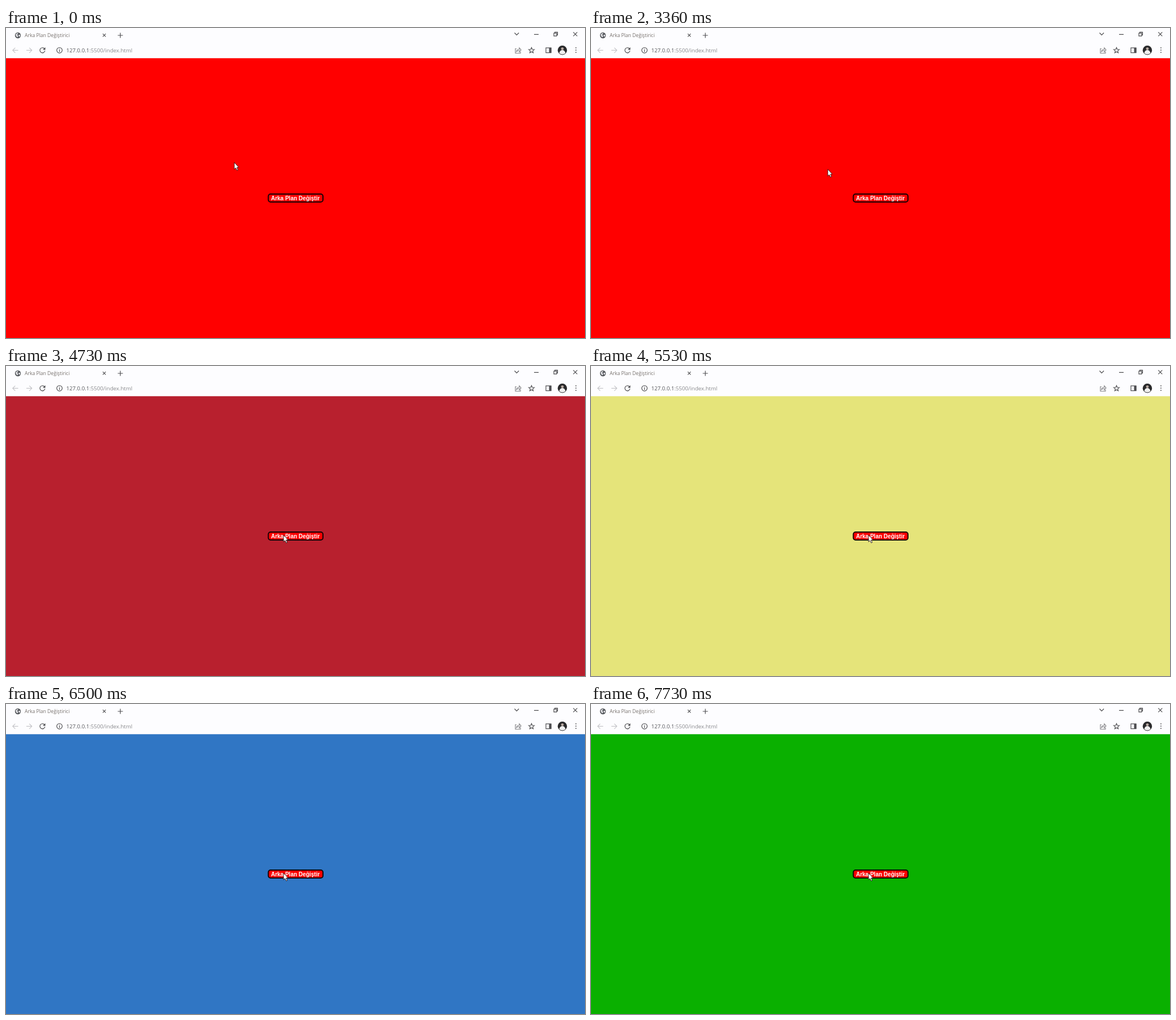
Animation, 1023 px wide and 547 px high, one loop 8 s. Source, as an HTML page:

```html
<!DOCTYPE html>
<html lang="tr">
<head>
<meta charset="utf-8">
<title>Arka Plan Değiştirici</title>
<style>
  html, body { margin: 0; width: 100%; height: 100%; overflow: hidden; }
  svg { display: block; width: 1023px; height: 547px; }
  text { font-family: "Open Sans", sans-serif; white-space: pre; }
  .icon { fill: none; stroke: #4d4d50; stroke-width: 1.2; }
  .pale { stroke: #c6c6ca; }
  .label { font: bold 10px "Liberation Sans", Arial, sans-serif; fill: #fff; }
</style>
</head>
<body>
<svg viewBox="0 0 1023 547">
  <rect width="1023" height="54" fill="#fdfdff"/>
  <rect id="page" y="53.3" width="1023" height="494" fill="#f00"/>

  <!-- tab strip -->
  <circle cx="21" cy="13" r="5.2" fill="#55585c"/>
  <path d="M17 11.5q2-3 4.5-2.5l-.5 2-2 1 2.5 1.5-1 3q-3-1-3.5-5M22 12.5l3-1v3l-2 1z" fill="#e4e4e8"/>
  <text x="33" y="16" font-size="8.6" fill="#77716c">Arka Plan Değiştirici</text>
  <path class="icon" d="M171 10.2l5.2 5.2m0-5.2l-5.2 5.2"/>
  <path class="icon" stroke-width="1.5" d="M202 8.5v9M197.5 13h9"/>
  <path class="icon" d="M898.5 8.5l3.8 4 3.8-4M933 11.3h8M968 9.2h5v5h-5zM969.5 9v-1.7h5v5H973M1002.3 7.3l7 7m0-7l-7 7"/>

  <!-- toolbar -->
  <path class="icon pale" d="M21.5 39.3h-9.5m4.3-4.5l-4.5 4.5 4.5 4.5M36 39.3h9.5m-4.3-4.5l4.5 4.5-4.5 4.5"/>
  <path class="icon" stroke-width="1.4" d="M68.3 37a4.5 4.5 0 1 0 .5 3.2"/>
  <path d="M69.5 34v4.5H65z" fill="#4d4d50"/>
  <circle class="icon" cx="94.5" cy="39.3" r="4.8"/>
  <path class="icon" d="M94.5 38.6v3.3M94.5 36.4v1.2"/>
  <text x="106.5" y="42.7" font-size="9.65" fill="#55565a">127.0.0.1<tspan fill="#88898c">:5500/index.html</tspan></text>
  <path class="icon" stroke="#77777a" stroke-width="1" style="stroke:#88888b" d="M902 36.5h-2v8h9v-2.5M902 41.5q.5-4 5-4v-2.5l3 3.7-3 3.6v-2.5q-3-.3-5 1.7z"/>
  <path class="icon" d="M928.5 34.6l1.4 3.2 3.5.3-2.7 2.3.8 3.4-3-1.8-3 1.8.8-3.4-2.7-2.3 3.5-.3z"/>
  <rect class="icon" x="954" y="35" width="9" height="8.6"/>
  <path d="M959.5 35h4v8.6h-4z" fill="#4d4d50"/>
  <circle cx="983" cy="39.3" r="8.2" fill="#29292b"/>
  <path d="M977.5 44.5q1-5.5 5.5-5.5t5.5 5.5q-5.5 4-11 0" fill="#f0f0f0"/>
  <circle cx="983" cy="36.6" r="2.4" fill="#b9aaa2"/>
  <path d="M1007 35v9" stroke="#4d4d50" stroke-width="1.8" stroke-linecap="round" stroke-dasharray="0 4"/>

  <rect x="463.5" y="293" width="96.5" height="14" rx="4" fill="#f00" stroke="#160205" stroke-width="2"/>
  <text class="label" x="468.2" y="303.5">Arka Plan Değiştir</text>
  <path id="cursor" d="M.3.3V12.2L3 9.8 5 14.2 6.9 13.3 5 9H8.4z" fill="#fff" stroke="#1c0808" stroke-width=".8"/>
</svg>
<script>
const LOOP = 8000;

// [time, x, y] of the pointer tip
const moves = [
  [0, 403, 237], [300, 425, 246], [500, 425, 246], [900, 482, 272],
  [1300, 524, 287], [1630, 537, 306], [1760, 537, 306], [1830, 535, 300],
  [2359, 535, 300], [2360, 366, 151], [3000, 366, 151], [3150, 335, 178],
  [3360, 418, 249], [3400, 418, 249], [3560, 518, 290], [3830, 490, 296],
  [3860, 490, 298], [LOOP, 490, 298]
];

// [time, colour] of the page background
const colours = [
  [0, "#ff0000"], [4260, "#9a4a58"], [4730, "#b8202e"], [5030, "#a08060"],
  [5530, "#e5e47a"], [5830, "#9aa080"], [6030, "#6a8a9a"], [6500, "#3076c4"],
  [6860, "#5c8090"], [7230, "#5a8a60"], [7660, "#3c983c"], [7700, "#20a41c"],
  [7730, "#0ab000"]
];

const page = document.getElementById("page");
const cursor = document.getElementById("cursor");
let start;

function pointerAt(t) {
  const i = moves.findIndex(m => m[0] > t);
  const [t0, x0, y0] = moves[i - 1], [t1, x1, y1] = moves[i];
  const k = (t - t0) / (t1 - t0);
  return [x0 + (x1 - x0) * k, y0 + (y1 - y0) * k];
}

function draw(now) {
  start ??= now;
  const t = (now - start) % LOOP;
  page.setAttribute("fill", colours.findLast(c => c[0] <= t)[1]);
  cursor.setAttribute("transform", `translate(${pointerAt(t)})`);
  requestAnimationFrame(draw);
}
requestAnimationFrame(draw);
</script>
</body>
</html>
```
